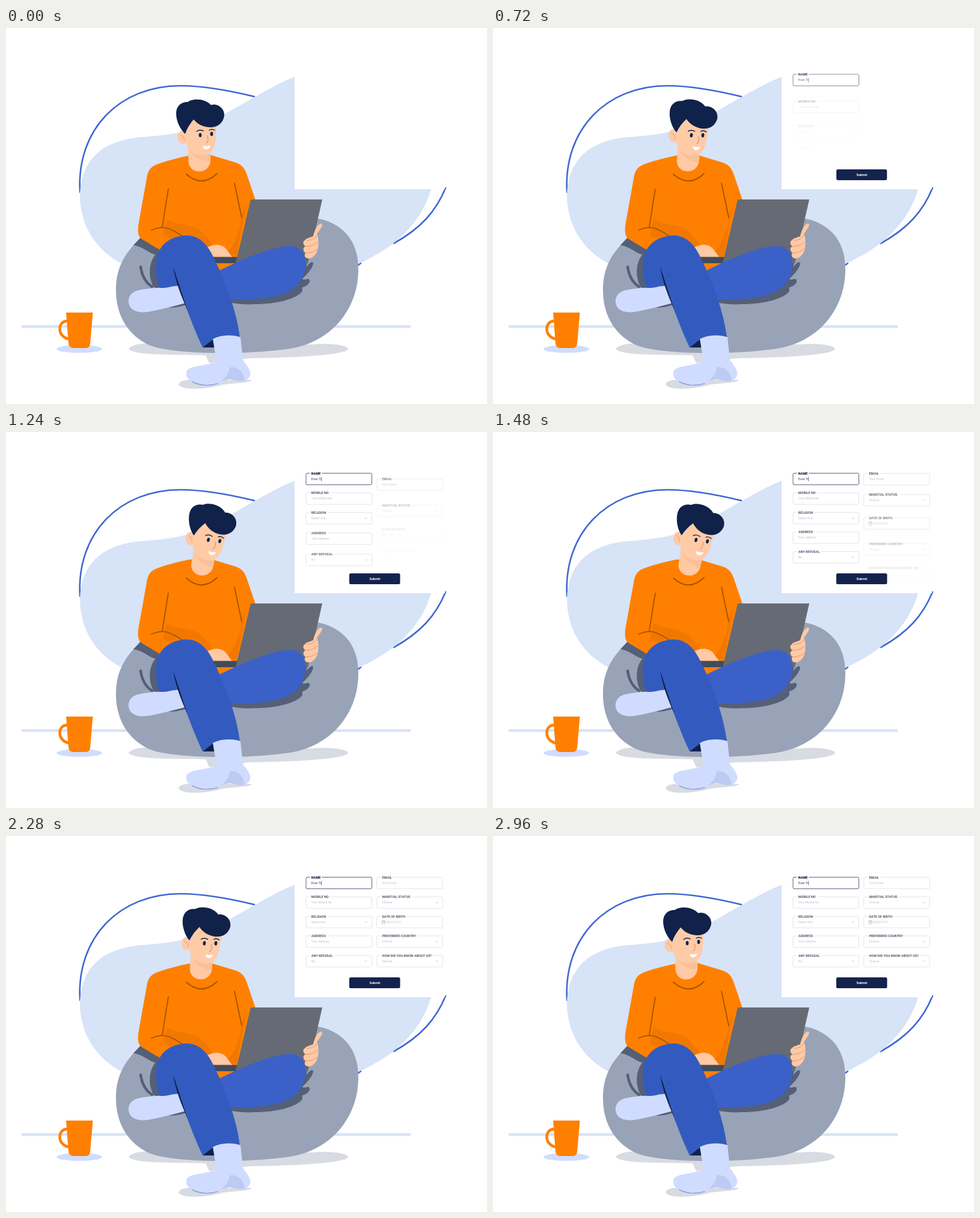
These frames come from a looping animation (800x625 px, 3000 ms). An HTML page with a canvas:

```html
<!DOCTYPE html>
<html lang="en">
<head>
<meta charset="utf-8">
<title>Filling in a form</title>
<style>
html, body { margin: 0; width: 100%; height: 100%; overflow: hidden; background: #fff; }
canvas { display: block; }
</style>
</head>
<body>
<canvas id="stage" width="800" height="625"></canvas>
<script>
const c = document.getElementById('stage').getContext('2d');
const LOOP = 3000, STEP = 40;
const NAVY = '#10214a', ORANGE = '#ff8000', SEAM = '#a65300', SKIN = '#ffc9a4',
      FOLD = '#545f78', SOCK = '#d0dcff', SKY = '#d7e3f7', BLUE = '#3f68d2';

function fill(color, d) {
  c.fillStyle = color;
  c.fill(new Path2D(d));
}

function line(color, width, d) {
  c.strokeStyle = color;
  c.lineWidth = width;
  c.stroke(new Path2D(d));
}

function oval(color, x, y, rx, ry, turn = 0) {
  c.fillStyle = color;
  c.beginPath();
  c.ellipse(x, y, rx, ry, turn, 0, Math.PI * 2);
  c.fill();
}

function backdrop() {
  line(BLUE, 2.6, 'M413 114C380 106 330 96 290 96C189 96 117 168 123 273');
  line(BLUE, 2.6, 'M731 266C715 305 690 333 645 358M590 391L586 394');
  fill(SKY, 'M480 81C440 97 400 124 345 153C302 175 268 178 230 181C165 185 124 215 123 280C124 330 150 370 195 393L400 440L586 392C645 366 690 326 707 268L480 268Z');
  c.fillStyle = SKY;
  c.fillRect(26, 494, 647, 4.5);
}

function mug() {
  oval(SOCK, 122, 533.5, 38, 6.5);
  line(ORANGE, 4.5, 'M104 487C85 485 84 514 105 517');
  fill(ORANGE, 'M100 473H144.5L140 525Q139 532 133 532H112Q105 532 104 525Z');
}

function beanbag() {
  const shade = 'rgba(16,33,74,.16)';
  fill(shade, 'M204 533C214 522 240 524 270 526H510C540 523 570 528 569 534C560 545 470 548 405 549L338 557L332 544C270 543 210 544 204 533Z');
  fill(shade, 'M287 592C290 585 300 585 310 585H409C408 590 380 590 360 593C335 601 290 603 287 592Z');
  fill('#99a3b7', 'M213 360C190 385 182 410 183 440C184 480 205 512 238 527C270 541 380 545 465 534C543 525 586 465 586 402C587 350 555 322 515 316L420 300L300 330Z');
  fill(FOLD, 'M212 361L224 348L265 366L254 378C240 377 230 364 212 361Z');
  fill(FOLD, 'M256 371C238 380 234 412 246 431L262 435Z');
  line(FOLD, 4.5, 'M224 397C226 412 232 423 243 430');
  fill(FOLD, 'M262 463C275 456 288 454 300 450V460C285 465 272 466 262 463Z');
  fill(FOLD, 'M370 440L480 428C485 416 492 406 499 398C503 392 509 386 511 391C510 399 502 408 496 414C489 420 497 418 503 417C508 420 504 427 496 430C489 433 494 430 493 437C485 450 450 459 415 459C400 460 385 459 372 456Z');
  fill(FOLD, 'M492 380L502 384L497 410L490 405Z');
}

function sweater() {
  fill(ORANGE, 'M305 212C280 217 256 224 246 229C237 234 235 243 234 250L220 328C219 341 220 347 226 351L256 369L300 390L356 404L383 396L420 310L415 286L400 242C396 231 390 226 380 223L340 211Z');
  fill('#f17800', 'M268 318C280 328 315 326 325 338C334 347 341 357 345 362C355 357 364 364 370 371C383 355 389 335 392 310L400 292L384 378L340 380L262 345L263 331Z');
  line(SEAM, 1.8, 'M270 268C266 290 263 312 260 331');
  line(SEAM, 1.8, 'M242 336C255 331 263 330 272 334C283 339 290 343 294 347');
  line(SEAM, 1.8, 'M380 258C385 282 389 300 392 315');
  line(SEAM, 2, 'M300 243Q326 266 351 242');
}

function laptop() {
  fill(SKIN, 'M330 368C342 359 356 357 366 367L377 382H342Z');
  fill('#434b59', 'M340 380.5H388L382 391H344Z');
  fill('#656a74', 'M407 285H526L502 391H382Z');
}

function legs() {
  fill('#3b61c8', 'M355 403C388 387 440 363 473 362C492 363 498 378 498 390C498 420 480 441 440 447C412 452 392 452 372 450L345 410Z');
  fill(SOCK, 'M291 428C270 432 240 431 220 436C206 440 203 449 204 457C206 470 220 474 235 472C258 468 280 462 299 457Z');
  fill(NAVY, 'M327 531L346 515L352 531Z');
  fill('#335bbf', 'M250 400C248 375 258 352 290 346C312 341 330 352 342 375C360 410 383 465 389 514C370 509 352 512 344 518L327 531C316 508 306 482 297 457L288 429C278 427 272 433 256 432C251 424 250 410 250 400Z');
  fill(NAVY, 'M278 397C282 420 290 444 303 471C294 448 288 425 278 397Z');
  fill(SOCK, 'M344 517C355 510 378 509 390 514L394 552C402 562 408 570 406 578C402 587 393 588 382 586C372 582 365 585 358 588C348 595 328 596 314 590C300 586 297 574 302 568C312 560 338 562 350 553Z');
  fill('#bdcaf1', 'M372 564C385 562 395 571 397 586C388 589 378 584 372 584C366 584 362 586 356 589C367 581 371 573 372 564Z');
  line('#8ea5dc', 1.5, 'M310 588C322 595 340 595 352 591');
}

function grip() {
  fill(SKIN, 'M511 346C513 336 518 326 524 325C528 326 525 332 517 342C520 348 520 358 519 365C518 373 513 381 505 383C498 384 495 378 498 374C493 369 494 365 498 363C493 359 494 354 497 353C499 349 505 349 511 346Z');
  line('#db9773', 1, 'M498 363C507 363 514 360 518 356M498 374C507 374 514 371 518 367M501 353C508 353 514 350 517 345');
}

function head(t) {
  const lean = (1 - Math.cos(t / LOOP * Math.PI * 2)) / 2;
  c.save();
  c.translate(324, 243);
  c.rotate(lean * 13 * Math.PI / 180);
  c.translate(-324, -243);
  fill(SKIN, 'M302 185L303.5 222C305 244 337 244 340 222V198Z');
  fill('#f9c09a', 'M306 205C315 211 326 213 339 209V222C325 220 312 215 306 205Z');
  oval(SKIN, 293.5, 182, 8, 11, -.2);
  line('#e6a67f', 1.2, 'M290 178Q296 180 297 187');
  fill('#ffcba7', 'M312 150C302 163 298 176 298 188C301 198 306 206 316 209C325 213 336 212 341 206C347 200 349 190 349 180L351 152Z');
  fill(NAVY, 'M298 176C290 169 283 155 283 142C283 130 291 123 302 123C310 117 330 116 341 128C351 125 364 133 363 146C361 158 352 165 340 165C328 165 319 160 312 152C306 159 301 167 298 176Z');
  oval(NAVY, 323, 178, 2.4, 3.6);
  oval(NAVY, 342, 176, 2.4, 3.6);
  line(NAVY, 1.4, 'M317 172Q322 168 328 171M338 170Q342 167 347 170');
  line('#d98f68', 1.2, 'M335 179Q338 189 333 191');
  fill('#fff', 'M327 196Q334 198 340 195Q338 202 332 202Q328 201 327 196Z');
  c.restore();
}

// label, value, kind, start time
const columns = [
  { x: 499, rows: [
    ['NAME', 'Evan Tr', 'active', 180],
    ['MOBILE NO', 'Your Mobile No', '', 310],
    ['RELIGION', 'Select One', 'list', 435],
    ['ADDRESS', 'Your Address', '', 550],
    ['ANY REFUSAL', 'No', 'list', 632]] },
  { x: 616.7, rows: [
    ['EMAIL', 'Your Email', '', 715],
    ['MARITIAL STATUS', 'Choose', 'list', 830],
    ['DATE OF BIRTH', '2022-07-01', 'date', 945],
    ['PREFERRED COUNTRY', 'Choose', 'list', 1060],
    ['HOW DID YOU KNOW ABOUT US?', 'Choose', 'list', 1165]] }
];

function text(str, x, y, font, color) {
  c.font = font + ' Roboto, Arial, sans-serif';
  c.fillStyle = color;
  c.fillText(str, x, y);
}

function field(x, y, [label, value, kind]) {
  const w = 109.5, h = 19.2, r = 2, on = kind === 'active';
  text(label, x + 8.8, y + 2.4, (on ? 900 : 700) + ' 5.5px', on ? '#111b3d' : '#505768');
  const gap = x + 8.8 + c.measureText(label).width + 2.5;
  c.strokeStyle = on ? '#59617a' : '#dadde4';
  c.lineWidth = on ? 1 : .8;
  c.beginPath();
  c.moveTo(gap, y);
  c.arcTo(x + w, y, x + w, y + h, r);
  c.arcTo(x + w, y + h, x, y + h, r);
  c.arcTo(x, y + h, x, y, r);
  c.arcTo(x, y, x + w, y, r);
  c.lineTo(x + 6, y);
  c.stroke();
  const date = kind === 'date';
  text(value, x + (date ? 15.3 : 8.8), y + 11.4, '400 5px', on ? '#333c55' : '#bfc1c7');
  if (on) {
    const end = x + 9.3 + c.measureText(value).width;
    line('#333c55', .7, `M${end} ${y + 6.5}v6.5`);
  }
  if (date) line('#b4b7bf', .8, `M${x + 9} ${y + 7.5}h4.5v5h-4.5zM${x + 9} ${y + 9.2}h4.5M${x + 10} ${y + 6.5}v1M${x + 12.5} ${y + 6.5}v1`);
  if (kind === 'list') line('#a9adb6', .7, `M${x + 98} ${y + 9}l1.6 1.6l1.6 -1.6`);
}

function form(t) {
  c.fillStyle = '#fff';
  c.fillRect(480, 50, 250, 218);
  for (const { x, rows } of columns) {
    rows.forEach((row, i) => {
      const p = Math.min(1, Math.max(0, (t - row[3]) / 900));
      if (!p) return;
      const e = p < .5 ? 4 * p ** 3 : 1 - 4 * (1 - p) ** 3;
      c.globalAlpha = e;
      field(x, 68.5 + i * 32.5 + 33 * (1 - e), row);
    });
  }
  c.globalAlpha = 1;
  button(t - 110);
}

function button(age) {
  if (age <= 0) return;
  const s = 1 - Math.exp(-age * .00847) * Math.cos(age * Math.PI * 2 / 300);
  c.save();
  c.translate(613.2, 244);
  c.scale(s, s);
  c.fillStyle = '#14234d';
  c.beginPath();
  c.roundRect(-42.3, -9, 84.6, 18, 2.5);
  c.fill();
  c.textAlign = 'center';
  text('Submit', .3, 2, '700 5.6px', '#fff');
  c.restore();
}

function draw(t) {
  c.fillStyle = '#fff';
  c.fillRect(0, 0, 800, 625);
  c.lineCap = c.lineJoin = 'round';
  backdrop();
  mug();
  beanbag();
  sweater();
  laptop();
  legs();
  grip();
  head(t);
  form(t);
}

const begin = performance.now();
function tick() {
  const t = (performance.now() - begin) % LOOP;
  draw(Math.floor(t / STEP) * STEP);
  requestAnimationFrame(tick);
}
tick();
</script>
</body>
</html>
```
